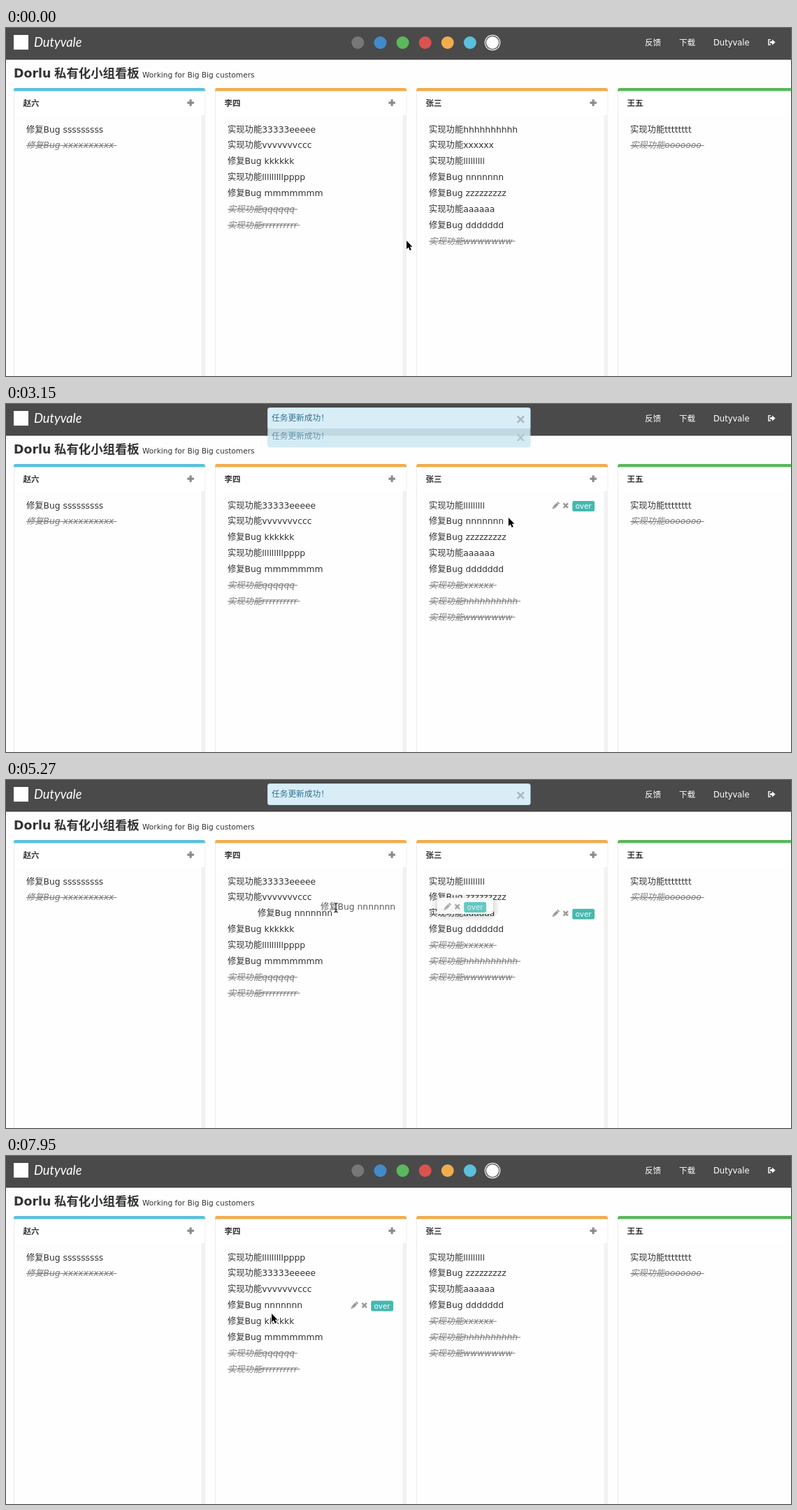
An HTML page with a canvas for the animation above (8 s loop, 1123 by 499 pixels).

```html
<!DOCTYPE html>
<html lang="zh-CN">
<head>
<meta charset="utf-8">
<title>Task board</title>
<style>
html, body { margin: 0; width: 100%; height: 100%; overflow: hidden; background: #fefefe; }
canvas { display: block; width: 1123px; height: 499px; }
</style>
</head>
<body>
<canvas id="stage"></canvas>
<script>
const W = 1123, H = 499, LOOP = 8000;
const SANS = '"DejaVu Sans", "Noto Sans CJK SC", "Noto Sans CJK", sans-serif';
const ROW = 22.86, TOP = 145, SLOT = 39.5;
const canvas = document.getElementById('stage');
const ctx = canvas.getContext('2d');
const dpr = window.devicePixelRatio || 1;
canvas.width = W * dpr;
canvas.height = H * dpr;

// Bursts of screen updates: start, end, number of steps
const BURSTS = [
  [150, 770, 5], [1070, 1520, 4], [1810, 2850, 8], [3000, 4040, 8],
  [4190, 5090, 7], [5270, 6310, 8], [6610, 7510, 7], [7660, 7950, 3]
];

// time, x, y, shape
const POINTER = [
  [0, 573, 305, 'arrow'], [150, 577, 296, 'arrow'], [450, 625, 215, 'arrow'],
  [615, 655, 165, 'beam'], [770, 664, 150, 'beam'], [1070, 680, 150, 'beam'],
  [1220, 735, 147, 'arrow'], [1370, 795, 145, 'arrow'], [1520, 825, 144, 'hand'],
  [1810, 825, 149, 'hand'], [2850, 825, 150, 'hand'], [3000, 800, 153, 'arrow'],
  [3148, 719, 163, 'arrow'], [3300, 685, 168, 'beam'], [4040, 672, 170, 'beam'],
  [4190, 672, 196, 'beam'], [4640, 668, 196, 'beam'], [5090, 610, 187, 'beam'],
  [5270, 472, 183, 'beam'], [5418, 385, 190, 'beam'], [5710, 381, 192, 'arrow'],
  [6310, 381, 237, 'beam'], [6610, 381, 232, 'beam'], [7060, 381, 155, 'beam'],
  [7210, 381, 148, 'beam'], [7510, 381, 148, 'beam'], [7660, 381, 160, 'arrow'],
  [7950, 380, 226, 'arrow']
];

const DRAGS = [
  { text: '修复Bug nnnnnnn', from: 4150, to: 5650,
    path: [[4190, 605, 195], [4640, 603, 195], [5090, 552, 187], [5270, 450, 181], [5418, 322, 190]] },
  { text: '实现功能lllllllllpppp', from: 6600, to: 7350,
    path: [[6610, 317, 237], [7060, 317, 171], [7210, 317, 152], [7360, 317, 147]] }
];

// Rows showing their tools: from, to, column, row, pressed
const HOVERS = [
  [600, 1500, 2, 0], [1500, 2900, 2, 0, true], [2900, 3200, 2, 0], [3200, 4150, 2, 1],
  [5200, 5400, 2, 2], [5650, 5950, 1, 2], [5950, 6150, 1, 3], [6150, 6600, 1, 4],
  [6700, 7350, 1, 4], [7350, 7750, 1, 0], [7750, 7900, 1, 1], [7900, 8000, 1, 3]
];

const COLUMNS = [
  [11, '赵六', '#5bc0de'], [299, '李四', '#f0ad4e'],
  [587, '张三', '#f0ad4e'], [875, '王五', '#5cb85c']
];

const clamp = v => Math.max(0, Math.min(1, v));
const lerp = (a, b, p) => a + (b - a) * p;

function snap(t) {
  let held = 0;
  for (const [start, end, n] of BURSTS) {
    if (t < start) break;
    const step = (end - start) / (n - 1);
    held = start + Math.min(n - 1, Math.floor((t - start) / step + 0.001)) * step;
  }
  return held;
}

function follow(keys, t) {
  let i = 0;
  while (i < keys.length - 1 && keys[i + 1][0] <= t + 1) i++;
  const a = keys[i], b = keys[i + 1] || a;
  const p = b === a ? 0 : clamp((t - a[0]) / (b[0] - a[0]));
  return { x: lerp(a[1], b[1], p), y: lerp(a[2], b[2], p), kind: a[3] };
}

function text(str, x, y, size, color, style = '', family = SANS) {
  ctx.font = `${style} ${size}px ${family}`;
  ctx.fillStyle = color;
  ctx.fillText(str, x, y);
}

function rect(x, y, w, h, color) {
  ctx.fillStyle = color;
  ctx.fillRect(x, y, w, h);
}

function box(x, y, w, h, r, color) {
  ctx.beginPath();
  ctx.roundRect(x, y, w, h, r);
  ctx.fillStyle = color;
  ctx.fill();
}

function disc(x, y, r, color) {
  ctx.beginPath();
  ctx.arc(x, y, r, 0, Math.PI * 2);
  ctx.fillStyle = color;
  ctx.fill();
}

function line(points, width, color) {
  ctx.beginPath();
  points.forEach(([x, y], i) => i ? ctx.lineTo(x, y) : ctx.moveTo(x, y));
  ctx.lineWidth = width;
  ctx.strokeStyle = color;
  ctx.stroke();
}

function cross(x, y, r, width, color) {
  line([[x - r, y - r], [x + r, y + r]], width, color);
  line([[x + r, y - r], [x - r, y + r]], width, color);
}

function header() {
  rect(0, 0, W, 45, '#4a4a4a');
  rect(0, 44.5, W, 1, '#3f3f3f');
  rect(11, 10, 21, 21, '#fff');
  text('Dutyvale', 40, 27, 18.3, '#fff', 'italic', 'Lato, "Open Sans", sans-serif');
  const dots = ['#777', '#428bca', '#5cb85c', '#d9534f', '#f0ad4e', '#5bc0de'];
  dots.forEach((c, i) => disc(503.3 + i * 32.1, 21, 9, c));
  disc(696, 21, 11.3, '#fff');
  disc(696, 21, 10.2, '#4a4a4a');
  disc(696, 21, 9, '#fff');
  text('反馈', 914, 24.6, 11.6, '#fff');
  text('下载', 963, 24.6, 11.6, '#fff');
  text('Dutyvale', 1012, 24.6, 11.5, '#fff');
  line([[1094, 16.6], [1091, 16.6], [1091, 24], [1094, 24]], 1.4, '#fff');
  rect(1093, 19, 4, 2.8, '#fff');
  ctx.beginPath();
  ctx.moveTo(1096, 16.4);
  ctx.lineTo(1100.6, 20.4);
  ctx.lineTo(1096, 24.4);
  ctx.fill();
  text('Dorlu', 11, 71, 17.4, '#333', 'bold');
  text('私有化小组看板', 69, 71, 17.4, '#333', 'bold');
  text('Working for Big Big customers', 195, 71.3, 10.6, '#333');
}

function column([x, name, color]) {
  rect(x, 90, 1, H - 90, '#ececec');
  rect(x + 1, 90, 273, 35, '#fff');
  rect(x + 273.5, 90, 0.8, 35, '#eee');
  rect(x + 268.5, 125, 5.5, H - 125, '#f1f1f1');
  box(x, 86, 274, 4.6, [3, 3, 0, 0], color);
  text(name, x + 13.5, 111.6, 11.5, '#333', 'bold');
  rect(x + 248.3, 105.7, 9.6, 3, '#888');
  rect(x + 251.6, 102.4, 3, 9.6, '#888');
}

function task(str, x, y) {
  if (str[0] !== '~') return text(str, x, y + 4.6, 12.3, '#333');
  const label = str.slice(1) + ' ';
  text(label, x, y + 4.6, 12.3, '#7b7b7b', 'italic');
  rect(x, y + 0.2, ctx.measureText(label).width, 1, '#7b7b7b');
}

function tools(x, y, color) {
  ctx.save();
  ctx.translate(x + 181.5, y + 0.5);
  ctx.rotate(-Math.PI / 4);
  rect(-3.6, -1.9, 7, 3.8, '#999');
  rect(4, -1.9, 2, 3.8, '#999');
  ctx.beginPath();
  ctx.moveTo(-4, -1.9);
  ctx.lineTo(-7, 0);
  ctx.lineTo(-4, 1.9);
  ctx.fill();
  ctx.restore();
  cross(x + 195.7, y + 0.6, 3.2, 2.5, '#999');
  box(x + 205.2, y - 6, 31.8, 15, 2.5, color);
  ctx.textAlign = 'center';
  text('over', x + 221, y + 5.3, 10.4, '#fff');
  ctx.textAlign = 'left';
}

function ghost(str, x, y) {
  ctx.save();
  box(x + 158, y - 18, 97, 38, 18, 'rgba(0,0,0,.04)');
  ctx.shadowColor = 'rgba(0,0,0,.22)';
  ctx.shadowBlur = 7 * dpr;
  ctx.shadowOffsetY = 2 * dpr;
  box(x + 167, y - 12, 80, 23, 4, 'rgba(255,255,255,.92)');
  ctx.restore();
  ctx.save();
  ctx.globalAlpha = 0.8;
  task(str, x, y);
  tools(x, y, '#3fbbb5');
  ctx.restore();
}

function alertBar(y, alpha) {
  if (alpha <= 0) return;
  ctx.save();
  ctx.globalAlpha = alpha;
  box(374, y, 376.5, 31, 3.5, '#bce0ee');
  box(375, y + 1, 374.5, 29, 2.5, '#d9edf7');
  text('任务更新成功！', 380, y + 19, 11.7, '#31708f');
  cross(736.3, y + 17, 4.6, 2.6, '#a9b9c1');
  ctx.restore();
}

// Slide and fade in, wait, then slide and fade out
const presence = (t, start, end) => Math.min(clamp((t - start) / 300), clamp((end - t) / 300));

function alerts(t) {
  const a = presence(t, 2056, 4880), b = presence(t, 2949, 5800);
  alertBar(5 + SLOT * (a + b - 1), b);
  alertBar(5 + SLOT * (a - 1), a);
}

function lists(t) {
  const li = ['实现功能33333eeeee', '实现功能vvvvvvvccc', '修复Bug kkkkkk', '实现功能lllllllllpppp',
    '修复Bug mmmmmmm', '~实现功能qqqqqq', '~实现功能rrrrrrrrrr'];
  const zhang = ['实现功能hhhhhhhhhh', '实现功能xxxxxx', '实现功能lllllllll', '修复Bug nnnnnnn',
    '修复Bug zzzzzzzzz', '实现功能aaaaaa', '修复Bug ddddddd', '~实现功能wwwwwww'];
  const move = (from, i, to, j) => to.splice(j, 0, from.splice(i, 1)[0]);
  const finish = j => zhang.splice(j, 0, '~' + zhang.shift());
  if (t >= 2100) finish(6);
  if (t >= 3000) finish(5);
  if (t >= 4150) move(zhang, 1, zhang, 2);
  if (t >= 5200) move(zhang, 2, li, 2);
  if (t >= 6600) move(li, 4, li, 4 - liftStep(t));
  return [
    ['修复Bug sssssssss', '~修复Bug xxxxxxxxxx'], li, zhang,
    ['实现功能tttttttt', '~实现功能ooooooo']
  ];
}

const liftStep = t => Math.max(0, Math.min(4, Math.floor((t - 6609) / 150)));

function tasks(t) {
  const lift = liftStep(t), lifting = lift > 0 && t < 7330;
  lists(t).forEach((list, c) => list.forEach((str, r) => {
    let x = COLUMNS[c][0] + 18, y = TOP + r * ROW;
    if (c === 1 && r === 2 && t > 5200) x = lerp(605, 317, clamp((t - 5190) / 94));
    if (c === 1 && lifting) {
      if (r === 4 - lift) y += 2.2;
      if (r === 5 - lift) y -= 3.3;
    }
    task(str, x, y);
  }));
  for (const [from, to, c, r, pressed] of HOVERS) {
    if (t >= from && t < to) tools(COLUMNS[c][0] + 18, TOP + r * ROW, pressed ? '#3ea39d' : '#45b8b0');
  }
}

function outline(path, fill, edge, width) {
  const p = new Path2D(path);
  ctx.lineJoin = 'round';
  ctx.lineWidth = width;
  ctx.strokeStyle = edge;
  ctx.stroke(p);
  ctx.fillStyle = fill;
  ctx.fill(p);
  ctx.lineJoin = 'miter';
}

function pointer({ x, y, kind }) {
  ctx.save();
  ctx.translate(x, y);
  if (kind === 'arrow') {
    outline('M0 0V12L2.8 9.4 4.8 14 6.8 13.1 4.9 8.7H8.4Z', '#000', '#fff', 1.6);
  } else if (kind === 'hand') {
    outline('M-2 1Q-.8-.6.3 1L2 6 2.6 4.8Q4 4.2 4.7 5.6 6 4.9 6.6 6.2 8 6 8 8L7.2 12 6.5 16H.4L-3.6 10.6Q-4.2 8.6-2.2 9L-.9 10.2Z',
      '#fff', '#000', 1.8);
    line([[2.2, 10.5], [2.6, 13.5]], 0.7, '#000');
    line([[4.4, 10.3], [4.5, 13.5]], 0.7, '#000');
  } else {
    const beam = 'M-2.8-6.5Q0-6.5 0-4.5 0-6.5 2.8-6.5M0-4.5V4.5M-2.8 6.5Q0 6.5 0 4.5 0 6.5 2.8 6.5M-1.6 2.5H1.6';
    ctx.lineWidth = 2.6;
    ctx.strokeStyle = 'rgba(255,255,255,.75)';
    ctx.stroke(new Path2D(beam));
    ctx.lineWidth = 1.2;
    ctx.strokeStyle = '#111';
    ctx.stroke(new Path2D(beam));
  }
  ctx.restore();
}

function draw(t) {
  ctx.setTransform(dpr, 0, 0, dpr, 0, 0);
  rect(0, 0, W, H, '#fefefe');
  header();
  COLUMNS.forEach(column);
  tasks(t);
  for (const d of DRAGS) {
    if (t < d.from || t >= d.to) continue;
    const { x, y } = follow(d.path, t);
    ghost(d.text, x, y);
  }
  alerts(t);
  pointer(follow(POINTER, t));
}

const began = performance.now();
function tick() {
  draw(snap((performance.now() - began) % LOOP));
  requestAnimationFrame(tick);
}
tick();
</script>
</body>
</html>
```
